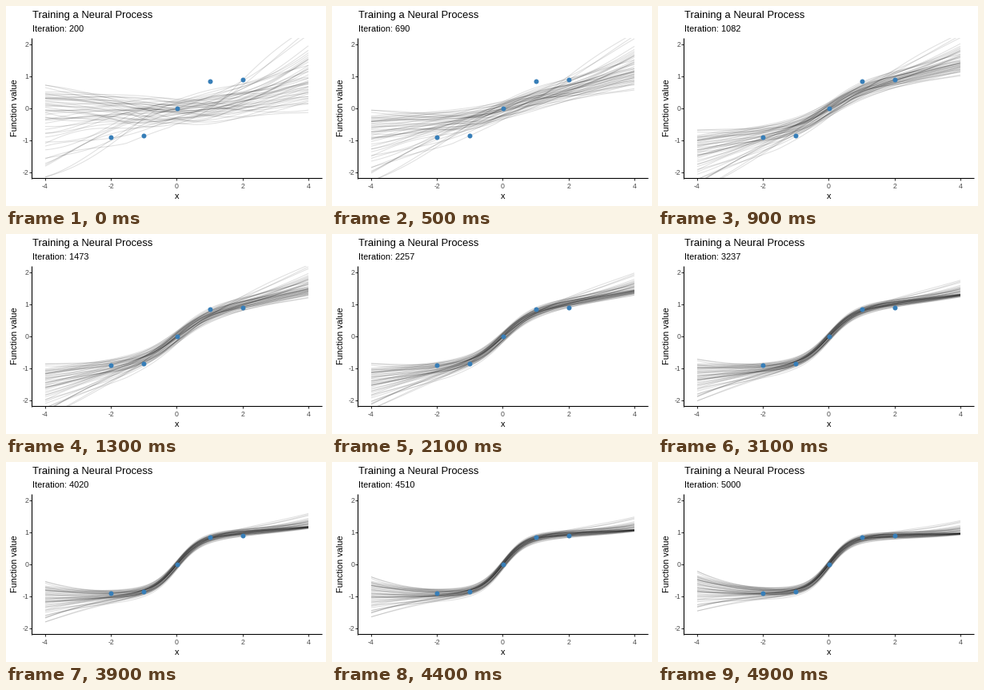
Animation of 400 by 250 pixels, one loop 5 s. Source, as a matplotlib script:

```python
import numpy as np
import matplotlib.pyplot as plt
from matplotlib.animation import FuncAnimation
from matplotlib.collections import LineCollection
from matplotlib.patches import Rectangle

WIDTH, HEIGHT, DPI = 400, 250, 100
FRAMES, INTERVAL = 50, 100
FIRST_ITER, LAST_ITER = 200, 5000
DRAWS = 50
PT = 72 / DPI  # points per pixel
LEFT, RIGHT, TOP, BOTTOM = 32.4, 394.5, 40, 215.4

plt.rcParams["font.family"] = "Liberation Sans"

X = np.linspace(-4, 4, 120)
REACH = np.abs(X) / 4


def px(x):
    return 213.5 + 41.125 * np.asarray(x)


def py(y):
    return 128 - 40 * np.asarray(y)


def latent_shapes():
    """One smooth curve within about [-1, 1] per draw, low left to high right."""
    rng = np.random.default_rng(11)

    def levels():
        u = rng.uniform(-1, 1, (DRAWS, 1))
        return np.sign(u) * np.abs(u) ** 1.4

    left, middle = levels(), levels()
    right = .7 * left + .5 * levels()
    shift = rng.normal(0, .5, (DRAWS, 1))
    steepness = rng.uniform(.9, 2.2, (DRAWS, 1))
    phase = rng.uniform(0, 2 * np.pi, (DRAWS, 1))
    side = 1 / (1 + np.exp(-steepness * (X - shift)))
    shape = right * side - left * (1 - side)
    shape = shape + .8 * middle * np.exp(-X ** 2 / 3)
    shape = shape + .12 * np.sin(1.1 * X + phase)
    return np.clip(shape, -1.1, 1.1)


SHAPES = latent_shapes()


def mean_function(p):
    """From a gentle ramp to a sharp sigmoid as training progresses."""
    ramp = .36 * np.log1p(np.exp(X - 1)) - .15
    fitted = ((.86 - .5 * (1 - p) ** 2) * np.tanh((.85 + .65 * p) * X)
              + (.31 - .28 * p) * X
              + .2 * p ** 4 * np.where(X < 0, REACH ** 3, 0))
    untrained = np.exp(-(p / .13) ** 2)
    return untrained * ramp + (1 - untrained) * fitted


def sampled_functions(p):
    early = np.exp(-p / .2)
    core = .15 + .3 * early
    edge = REACH ** (1.3 + 2 * p)
    below = core + edge * np.where(X < 0, .5 + early, -.1 + .7 * early)
    above = core + edge * np.where(X < 0, .4, .25 + early)
    return mean_function(p) + SHAPES * np.where(SHAPES > 0, above, below)


fig = plt.figure(figsize=(WIDTH / DPI, HEIGHT / DPI), dpi=DPI, facecolor="white")
ax = fig.add_axes([0, 0, 1, 1])
ax.set(xlim=(0, WIDTH), ylim=(HEIGHT, 0))
ax.axis("off")


def label(x, y, text, size, color="black", **kwargs):
    return ax.text(x, y, text, fontsize=size * PT, color=color,
                   va="baseline", **kwargs)


def stroke(xs, ys, color):
    ax.plot(xs, ys, color=color, lw=1.07 * PT, solid_capstyle="butt", zorder=4)


label(33, 15, "Training a Neural Process", 13)
subtitle = label(33, 32, "", 11)
label(213.5, 241, "x", 11, ha="center")
label(14, 127.5, "Function value", 11, ha="center", rotation=90,
      rotation_mode="anchor")

for v in (-4, -2, 0, 2, 4):
    stroke([px(v) - .1] * 2, [BOTTOM, BOTTOM + 3], "#333333")
    label(px(v) - .2, 228, str(v), 8.8, "#4d4d4d", ha="center")
for v in (-2, -1, 0, 1, 2):
    stroke([LEFT - 3, LEFT], [py(v)] * 2, "#333333")
    label(28, py(v) + 3.2, str(v), 8.8, "#4d4d4d", ha="right")
stroke([LEFT, LEFT], [TOP, BOTTOM + .5], "black")
stroke([LEFT - .5, RIGHT], [BOTTOM, BOTTOM], "black")

curves = LineCollection([], colors=[(0, 0, 0, .12)], linewidths=1.07 * PT, zorder=2)
ax.add_collection(curves)
curves.set_clip_path(Rectangle((LEFT, TOP), RIGHT - LEFT, BOTTOM - TOP,
                               transform=ax.transData))

observed = np.arange(-2, 3)
ax.scatter(px(observed), py(np.sin(observed)), s=(6 * PT) ** 2,
           color="#377eb8", linewidths=0, zorder=3)


def update(frame):
    progress = frame / (FRAMES - 1)
    iteration = FIRST_ITER + (LAST_ITER - FIRST_ITER) * progress
    subtitle.set_text(f"Iteration: {round(iteration)}")
    curves.set_segments([np.column_stack([px(X), py(y)])
                         for y in sampled_functions(progress)])
    return curves, subtitle


anim = FuncAnimation(fig, update, frames=FRAMES, interval=INTERVAL,
                     repeat=True, repeat_delay=0, blit=False)
plt.show()
```
